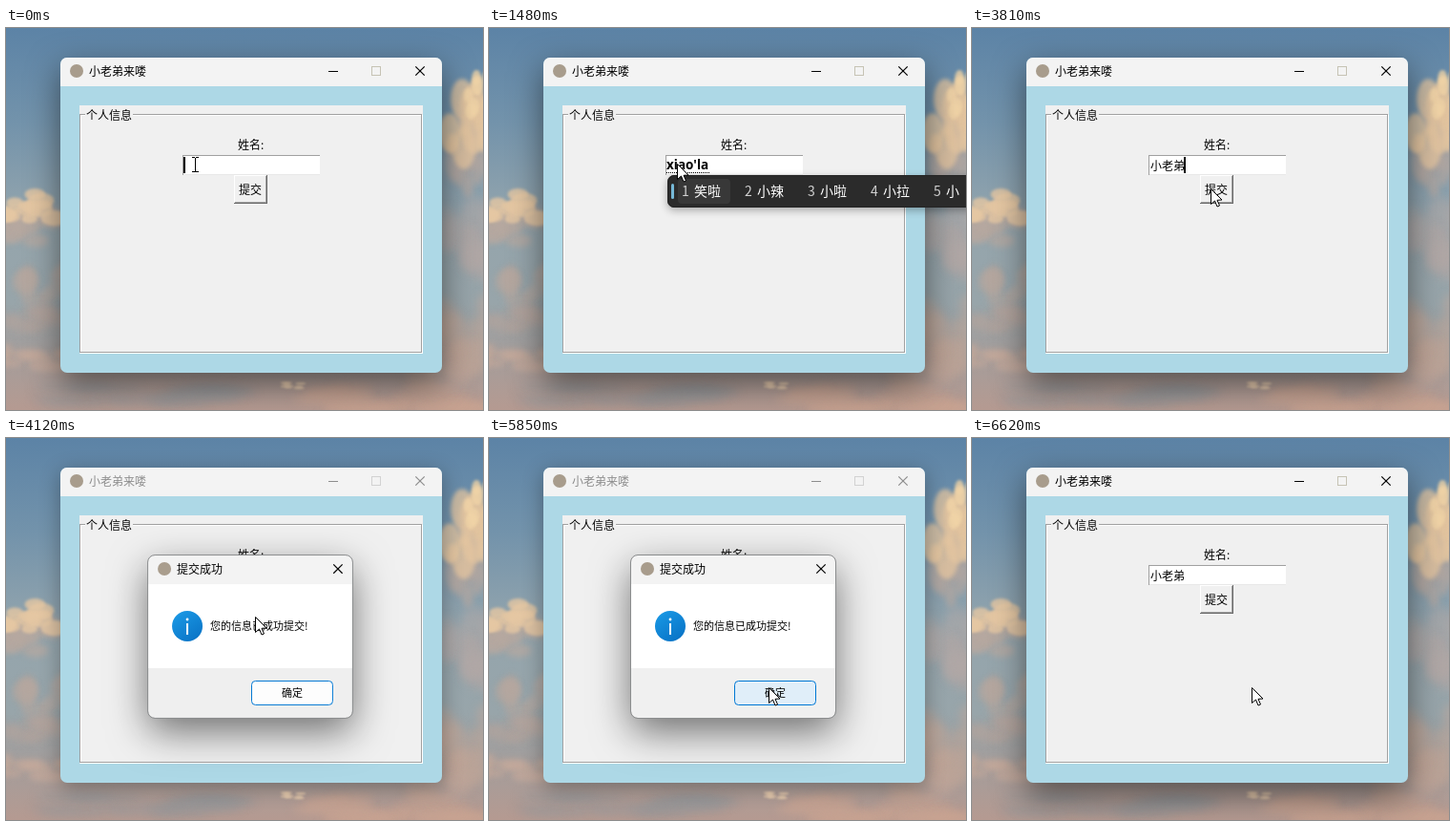
Recreate the animation shown at these times as an HTML page with a canvas. Size 500 by 400 pixels, loop 6770 ms.

```html
<!DOCTYPE html>
<html lang="zh-CN">
<head>
<meta charset="utf-8">
<style>
  html, body { margin: 0; width: 100%; height: 100%; overflow: hidden; }
  canvas { display: block; }
</style>
</head>
<body>
<canvas id="stage" width="500" height="400"></canvas>
<script>
const LOOP = 6770;
const SANS = '"Noto Sans CJK SC", "Noto Sans CJK", sans-serif';
const stage = document.getElementById('stage').getContext('2d');
let ctx = stage;

// Event times in ms
const COMMIT = 2480, PRESS = 3850, OPEN = 3960, HOVER = 4970, CONFIRM = 5900, CLOSE = 5980;

const COMPOSITION = [
  [610, 'x', '想 下 小 需 学 新 先'],
  [720, 'xi', '系 西 洗 喜 细 习 戏'],
  [880, 'xia', '下 夏 吓 瞎 虾 霞 峡'],
  [1030, 'xiao', '小 笑 校 效 晓 消 销'],
  [1330, "xiao'l", '小了 笑了 小路 小楼 小'],
  [1440, "xiao'la", '笑啦 小辣 小啦 小拉 小'],
  [1590, "xiao'lao", '小老 笑老 小劳 小捞 小'],
  [1850, "xiao'lao'd", '小老弟 小老的 小老大 小老'],
  [2020, "xiao'lao'di", '小老弟 小老底 小老 小']
];

// Pointer positions: time, x, y
const POINTER = [
  [0, 197, 142], [2740, 197, 142], [3400, 250, 168], [3960, 250, 168],
  [4150, 262, 188], [4240, 262, 189], [4560, 273, 225], [4680, 274, 227],
  [4890, 285, 252], [5180, 293, 261], [LOOP, 293, 261]
];

const clamp = v => Math.max(0, Math.min(1, v));
const smooth = v => v * v * (3 - 2 * v);

function box(x, y, w, h, color) {
  ctx.fillStyle = color;
  ctx.fillRect(x, y, w, h);
}

function rounded(x, y, w, h, r, fill, stroke) {
  ctx.beginPath();
  ctx.roundRect(x, y, w, h, r);
  if (fill) { ctx.fillStyle = fill; ctx.fill(); }
  if (stroke) { ctx.strokeStyle = stroke; ctx.lineWidth = 1; ctx.stroke(); }
}

function shadowed(color, blur, dy, draw) {
  ctx.save();
  ctx.shadowColor = color;
  ctx.shadowBlur = blur;
  ctx.shadowOffsetY = dy;
  draw();
  ctx.restore();
}

function text(str, x, midY, size = 12, color = '#000') {
  ctx.font = `${size}px ${SANS}`;
  ctx.fillStyle = color;
  ctx.fillText(str, x, Math.round(midY + size * 0.38));
}

function line(points, color, width = 1) {
  ctx.beginPath();
  points.forEach(([x, y], i) => i ? ctx.lineTo(x, y) : ctx.moveTo(x, y));
  ctx.strokeStyle = color;
  ctx.lineWidth = width;
  ctx.stroke();
}

function disc(x, y, r, color) {
  ctx.beginPath();
  ctx.arc(x, y, r, 0, Math.PI * 2);
  ctx.fillStyle = color;
  ctx.fill();
}

function cross(x, y, color) {
  line([[x - 4.7, y - 4.7], [x + 4.7, y + 4.7]], color, 1.2);
  line([[x + 4.7, y - 4.7], [x - 4.7, y + 4.7]], color, 1.2);
}

function paintSky() {
  const canvas = document.createElement('canvas');
  canvas.width = 500;
  canvas.height = 400;
  ctx = canvas.getContext('2d');
  const g = ctx.createLinearGradient(0, 0, 0, 400);
  [[0, '#5c83a6'], [0.25, '#7393ab'], [0.5, '#94a5ad'], [0.72, '#98a5aa'],
   [0.86, '#a49d9b'], [1, '#b59a91']].forEach(([at, c]) => g.addColorStop(at, c));
  box(0, 0, 500, 400, g);

  let seed = 11;
  const random = () => (seed = seed * 16807 % 2147483647) / 2147483647;
  const cloud = (x, y, w, h, color, puffs, alpha, blur) => {
    ctx.filter = `blur(${blur}px)`;
    ctx.globalAlpha = alpha;
    ctx.fillStyle = color;
    for (let i = 0; i < puffs; i++) {
      const r = 0.2 + random() * 0.25;
      ctx.beginPath();
      ctx.ellipse(x + (random() - 0.5) * w, y + (random() - 0.5) * h,
        w * r * 0.6, h * r * 0.7, 0, 0, Math.PI * 2);
      ctx.fill();
    }
  };
  cloud(490, 130, 50, 90, '#b3a7a0', 12, 0.7, 3);
  cloud(488, 98, 46, 70, '#e3c49f', 14, 0.75, 2);
  cloud(494, 68, 28, 40, '#f0d3a6', 9, 0.8, 1.5);
  cloud(20, 205, 80, 36, '#b7a8a0', 12, 0.7, 3);
  cloud(24, 188, 56, 28, '#e5c7a2', 14, 0.8, 1.5);
  cloud(40, 262, 50, 46, '#b6a69f', 10, 0.6, 3);
  cloud(15, 305, 70, 26, '#b5a49c', 10, 0.5, 4);
  cloud(30, 345, 90, 20, '#d0ad9b', 10, 0.55, 3);
  cloud(485, 225, 60, 70, '#b2a8a5', 12, 0.5, 5);
  cloud(475, 325, 80, 80, '#c4a698', 14, 0.45, 5);
  cloud(420, 390, 170, 28, '#caa391', 14, 0.5, 4);
  cloud(120, 385, 200, 20, '#8f9599', 12, 0.45, 5);
  cloud(297, 374, 28, 6, '#ecd0b0', 9, 0.8, 1);
  ctx = stage;
  return canvas;
}

const sky = paintSky();

function mainWindow(active) {
  shadowed(`rgba(0,0,0,${active ? 0.5 : 0.33})`, active ? 34 : 22, active ? 12 : 5,
    () => rounded(57, 31, 400, 330, 7, '#add8e6'));
  rounded(57, 31, 400, 30, [7, 7, 0, 0], '#f3f3f3');
  const ink = active ? '#000' : '#8d8d8d';
  disc(74, 45, 7, '#a89c8c');
  text('小老弟来喽', 87, 45, 12, ink);
  line([[338, 45.5], [348, 45.5]], ink);
  ctx.strokeStyle = active ? '#c6c3b4' : '#d2d2d2';
  ctx.strokeRect(383.5, 40.5, 9, 9);
  cross(434, 45, ink);

  box(77, 81, 360, 260, '#f0f0f0');
  ctx.lineWidth = 1;
  ctx.strokeStyle = '#fff';
  ctx.strokeRect(78.5, 91.5, 358, 249);
  ctx.strokeStyle = '#a0a0a0';
  ctx.strokeRect(77.5, 90.5, 358, 249);
  box(83, 84, 50, 14, '#f0f0f0');
  text('个人信息', 84, 91);
  text('姓名:', 243, 122);
}

function entry() {
  box(185, 133, 144, 21, '#fff');
  box(185, 133, 144, 1, '#a0a0a0');
  box(185, 133, 1, 21, '#a0a0a0');
  box(186, 153, 143, 1, '#e8e8e8');
}

function submitButton(pressed) {
  const [light, dark, inner] = pressed ? ['#696969', '#fff', '#f0f0f0'] : ['#fff', '#696969', '#a0a0a0'];
  box(239, 154, 35, 30, dark);
  box(239, 154, 34, 29, light);
  box(240, 155, 33, 28, inner);
  box(240, 155, 32, 27, '#f0f0f0');
  const shift = pressed ? 1 : 0;
  text('提交', 244 + shift, 169 + shift);
}

function caretVisible(t) {
  const since = t < 610 ? t + 300 : t < CLOSE ? t - COMMIT : t - CLOSE;
  return since % 900 < 600;
}

function entryContent(t) {
  const typing = t >= 610 && t < COMMIT;
  if (typing) {
    const [, letters, words] = COMPOSITION.findLast(step => t >= step[0]);
    ctx.font = 'bold 13.5px "Noto Sans", sans-serif';
    ctx.fillStyle = '#000';
    ctx.fillText(letters, 186, 148);
    const end = 186 + ctx.measureText(letters).width;
    for (let x = 186; x < end; x += 2) box(x, 151, 1, 1, '#000');
    candidates(words.split(' '));
    return;
  }
  const done = t >= COMMIT;
  if (done) text('小老弟', 187, 144);
  if (caretVisible(t)) box(done ? 222 : 186, 135, 2, 17, '#000');
}

function candidates(words) {
  shadowed('rgba(0,0,0,.3)', 8, 3, () => rounded(187, 154, 340, 34, 7, '#2b2b2b'));
  rounded(187.5, 154.5, 340, 33, 7, null, '#242424');
  let x = 202;
  words.forEach((word, i) => {
    const width = word.length * 14;
    if (i === 0) {
      rounded(198, 158, width + 27, 26, 4, '#383838');
      rounded(191, 163, 3, 16, 1.5, '#76b9d8');
    }
    text(i + 1, x, 171, 14, '#d0d0d0');
    text(word, x + 13, 171, 14, '#fff');
    x += width + 38;
  });
}

function dialog(t) {
  const shown = t < CLOSE ? clamp((t - OPEN) / 200) : 1 - clamp((t - CLOSE) / 140);
  if (shown <= 0) return;
  const ease = 1 - (1 - shown) ** 3;
  const scale = 0.9 + 0.1 * ease;
  ctx.save();
  ctx.globalAlpha = ease;
  ctx.translate(256, 208);
  ctx.scale(scale, scale);
  ctx.translate(-256, -208);

  shadowed('rgba(0,0,0,.55)', 40, 14, () => rounded(149, 123, 214, 170, 7, '#f0f0f0'));
  rounded(149, 123, 214, 30, [7, 7, 0, 0], '#f3f3f3');
  box(149, 153, 214, 88, '#fff');
  rounded(148.5, 122.5, 215, 171, 7.5, null, '#8b8d8e');
  disc(166, 137, 7, '#a89c8c');
  text('提交成功', 179, 137);
  cross(348, 137, '#000');

  const blue = ctx.createLinearGradient(180, 183, 200, 212);
  blue.addColorStop(0, '#1896e3');
  blue.addColorStop(1, '#0873c6');
  disc(190, 197, 16, blue);
  disc(190, 190, 1.4, '#fff');
  box(189, 194, 2, 12, '#fff');
  text('您的信息已成功提交!', 214, 197, 11);

  const fill = t >= CONFIRM ? '#cce4f7' : t >= HOVER ? '#e0eef9' : '#fdfdfd';
  rounded(257.5, 254.5, 85, 25, 4, fill, '#0078d4');
  text('确定', 289, 267, 11);
  ctx.restore();
}

function pointer(t) {
  const next = POINTER.findIndex(p => p[0] > t);
  const [t0, x0, y0] = POINTER[next - 1];
  const [t1, x1, y1] = POINTER[next];
  const k = smooth((t - t0) / (t1 - t0));
  const x = Math.round(x0 + (x1 - x0) * k);
  const y = Math.round(y0 + (y1 - y0) * k);
  const typing = t >= 610 && t < COMMIT;
  if (y < 154 && !typing) beam(x + 1, y + 1);
  else arrow(x, y);
}

function beam(x, y) {
  box(x, y - 7, 1, 15, '#000');
  for (const end of [y - 8, y + 7]) {
    box(x - 3, end, 3, 1, '#000');
    box(x + 1, end, 3, 1, '#000');
  }
}

function arrow(x, y) {
  ctx.beginPath();
  [[0, 0], [0, 16], [4, 12.5], [6.5, 18.5], [9, 17.5], [6.5, 11.8], [11.5, 11.5]]
    .forEach(([dx, dy]) => ctx.lineTo(x + dx + 0.5, y + dy + 0.5));
  ctx.closePath();
  ctx.fillStyle = '#fff';
  ctx.fill();
  ctx.strokeStyle = '#000';
  ctx.lineWidth = 1;
  ctx.stroke();
}

function draw(now) {
  const t = now % LOOP;
  ctx.drawImage(sky, 0, 0);
  mainWindow(t < OPEN || t >= CLOSE);
  entry();
  submitButton(t >= PRESS && t < OPEN);
  entryContent(t);
  dialog(t);
  pointer(t);
  requestAnimationFrame(tick);
}

let start;
function tick(now) {
  start ??= now;
  draw(Math.max(0, now - start));
}
requestAnimationFrame(tick);
</script>
</body>
</html>
```
